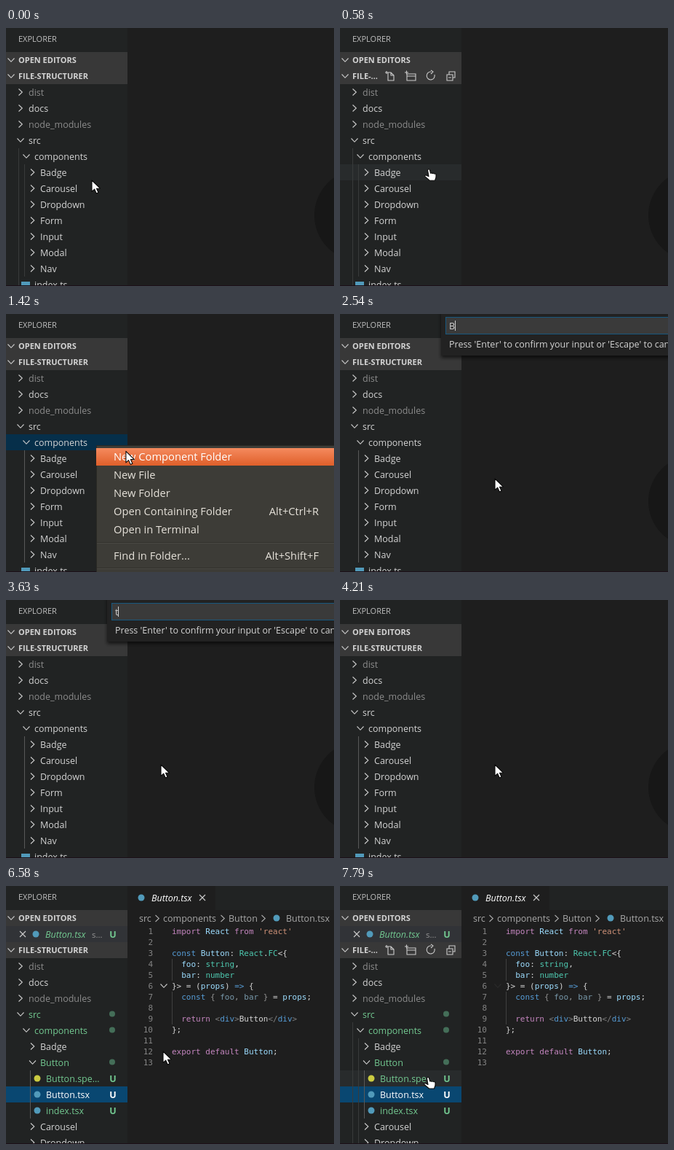
Animation, 451 px wide and 354 px high, one loop 8 s. Source, as an HTML page:

```html
<!DOCTYPE html>
<html lang="en">
<head>
<meta charset="utf-8">
<title>File structurer</title>
<style>
html, body { margin: 0; width: 100%; height: 100%; overflow: hidden; background: #1e1e1e; }
svg { display: block; width: 451px; height: 354px; }
text { font: 12.5px "Open Sans", "Noto Sans", sans-serif; white-space: pre; }
.head { font-size: 11px; }
.bold { font-weight: 700; }
.it { font-style: italic; }
.small { font-size: 11.5px; }
.menu { font-size: 14.7px; }
.code { font: 11px "DejaVu Sans Mono", monospace; }
</style>
</head>
<body>
<svg id="stage" viewBox="0 0 451 354" xmlns="http://www.w3.org/2000/svg"></svg>
<script>
const LOOP = 8000;
const SIDE = '#212323', EDITOR = '#1e1e1e', HEADER = '#383838';
const FG = '#d4d4d4', DIM = '#8c8c8c', GREEN = '#73c991', BLUE = '#519aba', YELLOW = '#cbcb41';
const MENU_FG = '#e6e2da';
const stage = document.getElementById('stage');

const esc = s => s.replace(/&/g, '&amp;').replace(/</g, '&lt;');
const rect = (x, y, w, h, fill, more = '') =>
  `<rect x="${x}" y="${y}" width="${w}" height="${h}" fill="${fill}" ${more}/>`;
const dot = (x, y, r, fill) => `<circle cx="${x}" cy="${y}" r="${r}" fill="${fill}"/>`;
const line = (d, color = '#cccccc', width = 1.1) =>
  `<path d="${d}" fill="none" stroke="${color}" stroke-width="${width}"/>`;
// y is the middle of the row
const label = (x, y, s, fill = FG, cls = '', more = '') =>
  `<text x="${x}" y="${y + (cls.startsWith('head') ? 4 : 5)}" fill="${fill}" class="${cls}" ${more}>${esc(s)}</text>`;
const chevron = (x, y, open, color) => line(open
  ? `M${x - 4.5} ${y - 2.5}l4.5 4.8 4.5-4.8` : `M${x - 2.5} ${y - 4.5}l4.8 4.5-4.8 4.5`, color);
const cross = (x, y) => line(`M${x - 4} ${y - 4}l8 8m0-8l-8 8`);

// Pointer moves: start, end, steps, target x, target y, sag
const MOVES = [
  [40, 130, 2, 116, 205, 0],
  [290, 960, 11, 123, 178, 0],
  [1130, 1130, 1, 159, 184, 0],
  [1330, 1750, 5, 216, 226, 0],
  [1960, 1960, 1, 213, 226, 0],
  [6580, 6580, 1, 216, 227, 0],
  [7210, 7790, 9, 118, 262, 26]
];

function pointerAt(t) {
  let x = 118, y = 209;
  for (const [start, end, steps, tx, ty, sag] of MOVES) {
    if (t < start) break;
    const gap = steps > 1 ? (end - start) / (steps - 1) : 1;
    const p = Math.min(1, (Math.floor((t - start) / gap + 1e-6) + 1) / steps);
    const e = p * p * (3 - 2 * p);
    x += (tx - x) * e;
    y += (ty - y) * e + sag * 2.8 * e * (1 - e);
  }
  return { x, y };
}

// Text typed so far, one letter per key time
const typed = (word, times, t) => word.slice(0, times.filter(k => t >= k).length);

function toolbar(y) {
  return line(`M66 ${y - 5}h4l4 4v7h-8zM70 ${y - 5}v4h4M62 ${y - 5}h4M64 ${y - 7}v4`)
    + line(`M92 ${y - 3}h12v9h-12zM92 ${y}h12M89 ${y - 5}h5M91.5 ${y - 7.5}v5`)
    + line(`M130 ${y - 2}a5.5 5.5 0 1 1-5-4M125 ${y - 8}l3 2-3 3`)
    + line(`M147 ${y - 2}h8v8h-8zM150 ${y - 2}v-4h8v8h-3M149 ${y + 2}h4`);
}

function treeRows(s) {
  const git = s.git ? GREEN : FG;
  const rows = [
    { name: 'dist', color: DIM }, { name: 'docs' }, { name: 'node_modules', color: DIM },
    { name: 'src', open: 1, color: git, mark: 'dot' },
    { name: 'components', depth: 1, open: 1, color: git, mark: 'dot', focus: s.menu },
    { name: 'Badge', depth: 2 }
  ];
  if (s.folder) rows.push({ name: 'Button', depth: 2, open: s.files, color: git, mark: 'dot' });
  if (s.files) rows.push(
    { name: s.git ? 'Button.spe…' : 'Button.spec.tsx', icon: YELLOW, color: git, mark: 'U' },
    { name: 'Button.tsx', icon: BLUE, color: s.editor ? '#ffffff' : FG, mark: 'U', chosen: s.editor },
    { name: 'index.tsx', icon: BLUE, color: git, mark: 'U' });
  for (const name of ['Carousel', 'Dropdown', 'Form', 'Input', 'Modal', 'Nav']) rows.push({ name, depth: 2 });
  rows.push({ name: 'index.ts', depth: 1, square: 1 });
  return rows;
}

function sidebar(s) {
  const shift = s.editor ? 22 : 0, top = 66 + shift;
  let out = rect(0, 0, 167, 354, SIDE) + label(17, 15, 'EXPLORER', '#c0c0c0', 'head')
    + rect(0, 33, 167, 22, HEADER) + rect(0, 55 + shift, 167, 22, HEADER)
    + chevron(7, 44, true) + label(17, 44, 'OPEN EDITORS', FG, 'head bold')
    + chevron(7, top, true) + label(17, top, s.bar ? 'FILE-…' : 'FILE-STRUCTURER', FG, 'head bold');
  if (s.bar) out += toolbar(top);
  if (s.editor) {
    out += rect(0, 55, 167, 22, '#313337') + cross(23, 66) + dot(41, 66, 4.5, BLUE)
      + label(54, 66, 'Button.tsx', s.git ? GREEN : FG, 'it')
      + label(118, 66, s.git ? 's…' : 'src/co…', '#949494', 'small');
    if (s.git) out += label(147, 66, 'U', GREEN, 'bold', 'text-anchor="middle"');
  }

  treeRows(s).forEach((r, i) => {
    const y = top + 22 * (i + 1);
    if (y > 366) return;
    const depth = r.depth || 0;
    const fill = r.chosen ? '#094771' : r.focus ? '#062f4a'
      : s.bar && Math.abs(s.p.y + 1 - y) < 11 ? '#282b2c' : '';
    if (fill) out += rect(0, y - 11, 167, 22, fill);
    if (r.icon) out += dot(43, y, 4.5, r.icon);
    else if (r.square) out += rect(21, y - 4, 12, 12, BLUE);
    else out += chevron([20, 28, 36.5][depth], y, r.open);
    out += label(r.icon ? 55 : 31 + depth * 8, y, r.name, r.color);
    if (s.git && r.mark === 'dot') out += dot(146, y - 0.5, 4, '#446e58');
    if (s.git && r.mark === 'U')
      out += label(147, y, 'U', r.chosen ? '#ffffff' : GREEN, 'bold', 'text-anchor="middle"');
  });

  const guide = (x, y, h, active) => rect(x, y, 1, h, active ? '#585858' : '#393b3b');
  if (s.inside) out += guide(17, 165 + shift, 189 - shift);
  if (s.files) {
    if (s.inside) out += guide(25, 187 + shift, 167 - shift);
    out += guide(33, 231 + shift, 66, true);
  } else out += guide(25, 187, s.folder ? 167 : 154, s.picked);
  return out;
}

const INK = { k: '#c586c0', b: '#569cd6', v: '#9cdcfe', t: '#4ec9b0', s: '#ce9178',
  w: '#d4d4d4', g: '#808080', u: '#7899ab', d: '#929292' };
// The first letter of each piece picks its colour
const CODE = [
  ['kimport ', 'vReact ', 'kfrom ', "s'react'"],
  [],
  ['bconst ', 'vButton', 'w: ', 'tReact', 'w.', 'tFC', 'w<{'],
  ['v  foo', 'w: ', 'tstring', 'w,'],
  ['v  bar', 'w: ', 'tnumber'],
  ['w}> = (', 'vprops', 'w) ', 'b=> ', 'w{'],
  ['b  const ', 'd{ ', 'ufoo', 'd, ', 'ubar', 'd } ', 'w= ', 'vprops', 'w;'],
  [],
  ['k  return ', 'g<', 'bdiv', 'g>', 'wButton', 'g</', 'bdiv', 'g>'],
  ['w};'],
  [],
  ['kexport default ', 'vButton', 'w;'],
  []
];

function editor(s) {
  let out = rect(167, 0, 284, 33, SIDE) + rect(167, 0, 121, 33, EDITOR)
    + dot(186, 16, 4.5, BLUE) + label(200, 16, 'Button.tsx', '#ffffff', 'it') + cross(270, 16);
  const crumb = '#a9a9a9';
  out += label(183, 44, 'src', crumb) + label(216, 44, 'components', crumb)
    + label(306, 44, 'Button', crumb) + label(385, 44, 'Button.tsx', crumb) + dot(372, 44, 4.5, BLUE);
  for (const x of [208, 298, 354]) out += chevron(x, 44.5, false, crumb);
  if (!s.code) return out;
  out += rect(228, 100, 1, 30, '#404040') + rect(228, 145, 1, 45, '#404040');
  CODE.forEach((parts, i) => {
    const y = 66 + 15 * i;
    out += `<text class="code" x="202" y="${y}" fill="#858585" text-anchor="end">${i + 1}</text>`
      + `<text class="code" x="228" y="${y}">`
      + parts.map(p => `<tspan fill="${INK[p[0]]}">${esc(p.slice(1))}</tspan>`).join('') + '</text>';
  });
  return out + `<g opacity="${s.fold}">${chevron(217, 137, true)}</g>`;
}

function menu(s) {
  const items = ['New Component Folder', 'New File', 'New Folder', 'Open Containing Folder', 'Open in Terminal'];
  const rule = y => rect(125, y, 326, 1, '#32312d') + rect(125, y + 1, 326, 1, '#4a4943');
  const key = (y, name) => label(430, y, name, MENU_FG, 'menu', 'text-anchor="end"');
  let out = rect(124.5, 180.5, 340, 190, '#3d3c37', 'stroke="#2a2925"');
  if (s.hot) out += rect(124, 184, 327, 24, 'url(#hot)');
  items.forEach((name, i) => {
    out += label(148, 196 + 25 * i, name, s.hot && !i ? '#ffffff' : MENU_FG, 'menu');
  });
  return out + rule(313) + rule(348) + label(148, 332, 'Find in Folder...', MENU_FG, 'menu')
    + key(271, 'Alt+Ctrl+R') + key(332, 'Alt+Shift+F');
}

const pen = document.createElement('canvas').getContext('2d');
function measure(word) {
  pen.font = '12.5px "Open Sans", "Noto Sans", sans-serif';
  return pen.measureText(word).width;
}

function prompt(s) {
  return rect(139, -6, 330, 63, SIDE, 'filter="url(#shadow)"')
    + rect(145.5, 4.5, 320, 23, '#3a3a3a', 'stroke="#17587f"')
    + (s.word ? label(150, 16, s.word) : label(150, 16, s.hint, DIM))
    + rect(150 + Math.round(measure(s.word)), 9, 1, 14, '#d0d0d0')
    + label(150, 41, "Press 'Enter' to confirm your input or 'Escape' to cancel");
}

const ARROW = 'M0 0V15.5L3.7 12.2 6.3 18 9 16.8 6.5 11.2H11.5Z';
const HAND = 'M1.5 1.5Q3-.5 4.5 1.5L5.5 6Q7 5 8 6.3 9.5 5.3 10.5 6.8 12.5 6 13 8V11.5L11.5 16H4.5'
  + 'L-2 10.5Q-3 8.5-.5 8.8L3 10.5Z';
const pointer = s =>
  `<path transform="translate(${s.p.x.toFixed(1)} ${s.p.y.toFixed(1)})" d="${s.bar ? HAND : ARROW}"`
  + ' fill="#fff" stroke="#0a0a0a" stroke-width="1.1" stroke-linejoin="round"/>';

const DEFS = '<defs><linearGradient id="hot" x2="0" y2="1"><stop stop-color="#f58a5e"/>'
  + '<stop offset="1" stop-color="#df5f2a"/></linearGradient>'
  + '<filter id="shadow" x="-10%" y="-30%" width="120%" height="160%">'
  + '<feDropShadow dx="0" dy="3" stdDeviation="2.5" flood-color="#000" flood-opacity=".65"/></filter></defs>';

function stateAt(t) {
  const p = pointerAt(t);
  const open = t >= 900 && t < 1435;
  const asking = t >= 1540 && t < 4210;
  const inside = p.x < 167 && !open && !asking;
  return {
    p, inside, bar: inside && t >= 40,
    menu: open, hot: t >= 1130, picked: t >= 900,
    asking, hint: t < 3330 ? 'Enter your component name' : 'Enter file extension (e.g. tsx, jsx)',
    word: t < 3330 ? typed('Button', [2540, 2710, 2880, 2960, 3040, 3130], t)
      : typed('tsx', [3630, 3710, 3960], t),
    folder: t >= 4250, files: t >= 4335, editor: t >= 4377, code: t >= 4418, git: t >= 5540,
    fold: Math.max(0.08, Math.min(1, 1 - (t - 7355) / 430)).toFixed(2)
  };
}

let last = '';
function draw(t) {
  const s = stateAt(t);
  const picture = DEFS + rect(0, 0, 451, 354, EDITOR)
    + (s.editor ? editor(s) : dot(487, 257, 63, '#171717'))
    + sidebar(s) + rect(0, 353, 451, 1, '#1c1018')
    + (s.menu ? menu(s) : '') + (s.asking ? prompt(s) : '') + pointer(s);
  if (picture !== last) stage.innerHTML = last = picture;
}

const begin = performance.now();
function tick() {
  draw((performance.now() - begin) % LOOP);
  requestAnimationFrame(tick);
}
tick();
</script>
</body>
</html>
```
